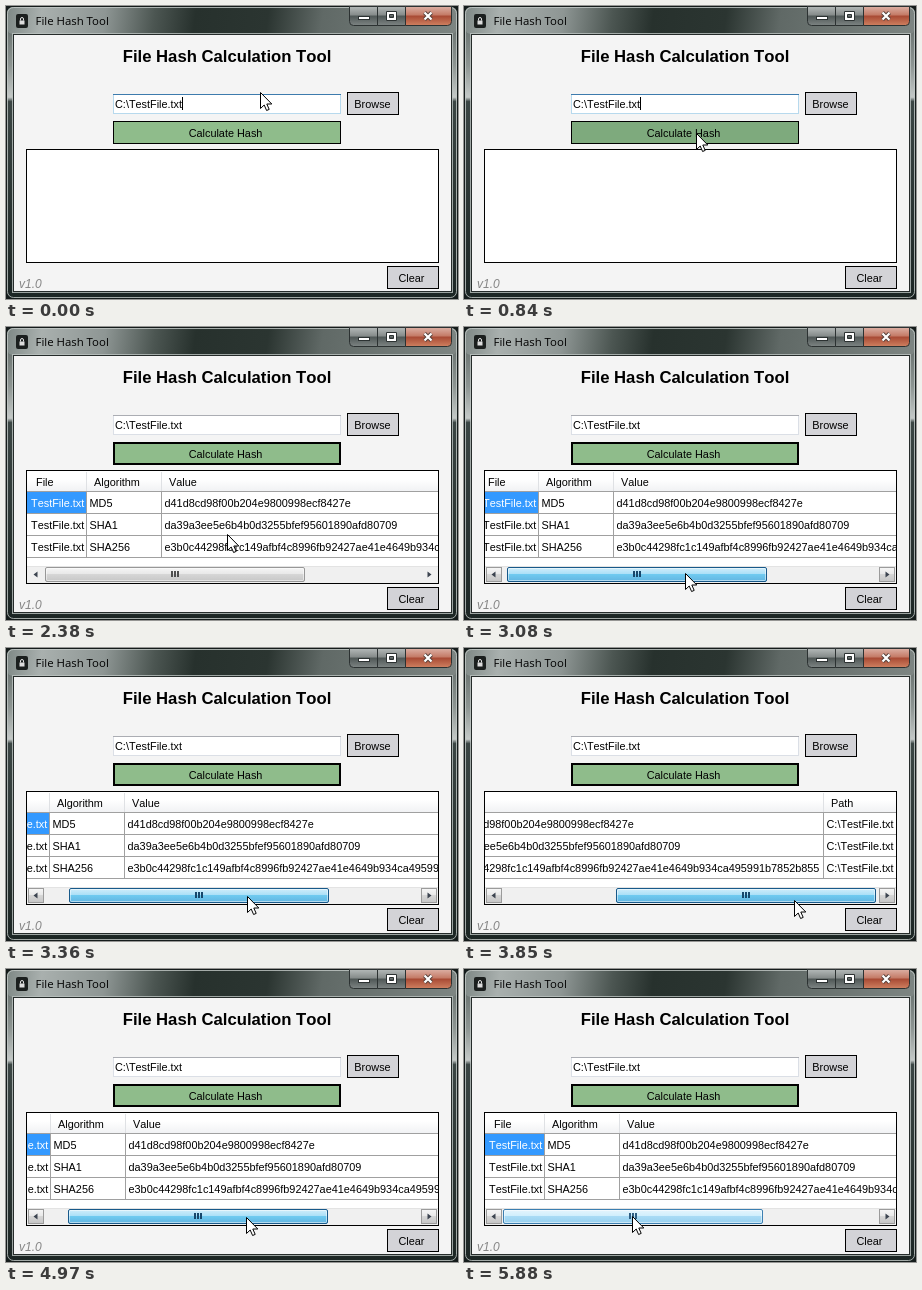
Animation of 452x293 px, one loop 6020 ms. Source, as an HTML page:

```html
<!DOCTYPE html>
<html lang="en">
<head>
<meta charset="utf-8">
<title>File Hash Tool</title>
<style>
  html, body { margin: 0; width: 100%; height: 100%; overflow: hidden; background: #1c2423; }
  svg { display: block; width: 452px; height: 293px; }
  text { font: 10.88px "Liberation Sans", Arial, sans-serif; font-kerning: none; white-space: pre; }
  .mid { text-anchor: middle; }
  .crisp { shape-rendering: crispEdges; }
  .heading { font-size: 16.7px; font-weight: bold; }
  .caption { font: 11.4px "Open Sans", "Noto Sans", sans-serif; }
  .status { font-size: 12px; }
  .version { font-size: 12px; font-style: italic; fill: #868686; }
  .line { stroke: #a0a0a0; }
  .headline { stroke: #dfe1e4; }
</style>
</head>
<body>
<svg viewBox="0 0 452 293">
  <defs>
    <linearGradient id="side" x2="0" y2="1">
      <stop offset="0" stop-color="#59625f"/><stop offset=".2" stop-color="#8d9592"/>
      <stop offset=".31" stop-color="#c4c9c7"/><stop offset=".325" stop-color="#3b4644"/>
      <stop offset="1" stop-color="#1c2624"/>
    </linearGradient>
    <linearGradient id="bar" gradientUnits="userSpaceOnUse" x1="0" y1="0" x2="446" y2="60">
      <stop offset="0" stop-color="#7d8784"/><stop offset=".08" stop-color="#a9b0ae"/>
      <stop offset=".22" stop-color="#8e9694"/><stop offset=".33" stop-color="#4c5652"/>
      <stop offset=".42" stop-color="#27312d"/><stop offset=".58" stop-color="#2b3531"/>
      <stop offset=".7" stop-color="#606966"/><stop offset="1" stop-color="#7d8582"/>
    </linearGradient>
    <linearGradient id="glass" x2="0" y2="1">
      <stop offset="0" stop-color="#b4b9b8"/><stop offset=".45" stop-color="#858b8a"/>
      <stop offset=".5" stop-color="#4f5756"/><stop offset="1" stop-color="#7d8483"/>
    </linearGradient>
    <linearGradient id="red" x2="0" y2="1">
      <stop offset="0" stop-color="#dcb0a4"/><stop offset=".45" stop-color="#c47a66"/>
      <stop offset=".5" stop-color="#a84a34"/><stop offset="1" stop-color="#cf8060"/>
    </linearGradient>
    <linearGradient id="header" x2="0" y2="1">
      <stop offset=".4" stop-color="#fff"/><stop offset="1" stop-color="#f1f2f4"/>
    </linearGradient>
    <linearGradient id="idle" x2="0" y2="1">
      <stop offset="0" stop-color="#f6f6f6"/><stop offset=".48" stop-color="#e8e8e8"/>
      <stop offset=".5" stop-color="#d6d6d6"/><stop offset="1" stop-color="#c6c6c6"/>
    </linearGradient>
    <linearGradient id="hover" x2="0" y2="1">
      <stop offset="0" stop-color="#e6f5fd"/><stop offset=".48" stop-color="#cfeefc"/>
      <stop offset=".5" stop-color="#a9dbf5"/><stop offset="1" stop-color="#98d0ef"/>
    </linearGradient>
    <linearGradient id="pressed" x2="0" y2="1">
      <stop offset="0" stop-color="#d2eefb"/><stop offset=".48" stop-color="#a9dff7"/>
      <stop offset=".5" stop-color="#6fcaf0"/><stop offset="1" stop-color="#62b4e0"/>
    </linearGradient>
    <clipPath id="view"><rect x="21" y="144" width="411" height="112"/></clipPath>
  </defs>

  <rect width="452" height="293" fill="#151c1b"/>
  <rect x="1" y="1" width="450" height="291" rx="6" fill="url(#side)"/>
  <rect x="1" y="1" width="450" height="27" rx="6" fill="url(#bar)"/>
  <rect x="1.5" y="1.5" width="449" height="290" rx="6" fill="none" stroke="#c3cac7" stroke-opacity=".8"/>
  <rect class="crisp" x="6.5" y="27.5" width="440" height="259" fill="none" stroke="#bcc4c1" stroke-opacity=".8"/>
  <rect class="crisp" x="7.5" y="28.5" width="438" height="257" fill="#f4f4f4" stroke="#252b2a"/>

  <rect x="10" y="8" width="12" height="14" rx="2" fill="#1b1f1e"/>
  <path d="M14.500 14.500v-1.5a1.500 1.500 0 0 1 3 0v1.500" fill="none" stroke="#e4e4e4"/>
  <rect x="13.500" y="14.500" width="5" height="4" fill="#ddd"/>
  <text class="caption" x="29.500" y="19">File Hash Tool</text>

  <g stroke="#2c3232">
    <path d="M343.5 0.5h28v19h-24q-4 0-4-4z" fill="url(#glass)"/>
    <path d="M371.5 0.5h28v19h-28z" fill="url(#glass)"/>
    <path d="M399.5 0.5h46v15q0 4-4 4h-42z" fill="url(#red)"/>
    <rect x="352.5" y="10.5" width="11" height="3" fill="#fff"/>
    <path d="M380.5 5.5h10v9h-10zM383.5 8.5v3h4v-3z" fill="#fff" fill-rule="evenodd"/>
  </g>
  <path d="M418.500 6.500l7 7m0-7l-7 7" stroke="#54403a" stroke-width="4"/>
  <path d="M418.500 6.500l7 7m0-7l-7 7" stroke="#fff" stroke-width="2.2"/>

  <text class="heading mid" x="221" y="56">File Hash Calculation Tool</text>
  <text id="status" class="status mid" x="219" y="81">Calculating File Hash</text>

  <g class="crisp">
    <rect id="field" x="107.5" y="88.5" width="227" height="19" fill="#fff"/>
    <path id="fieldTop" d="M107 88.500h228"/>
    <path id="caret" d="M176.500 91v13" stroke="#000"/>
    <rect x="341.5" y="86.500" width="51" height="22" fill="#d3d3d7" stroke="#000"/>
    <rect x="381.5" y="260.5" width="51" height="22" fill="#d3d3d7" stroke="#000"/>
    <rect id="calc" x="107.500" y="115.500" width="227" height="22" stroke="#000"/>
    <rect id="focus" x="108.500" y="116.500" width="225" height="20" fill="none" stroke="#000"/>
    <rect x="20.5" y="143.5" width="412" height="113" fill="#fff" stroke="#000"/>
  </g>
  <text x="109" y="102">C:\TestFile.txt</text>
  <text class="mid" x="366.500" y="102">Browse</text>
  <text class="mid" x="405.500" y="276">Clear</text>
  <text class="mid" x="219.500" y="131">Calculate Hash</text>
  <text class="version" x="13" y="282">v1.0</text>

  <g id="results" clip-path="url(#view)">
    <rect x="21" y="144" width="411" height="20" fill="url(#header)"/>
    <g id="grid"></g>
    <g class="crisp">
      <rect x="21" y="239" width="411" height="17" fill="#f0f0f0"/>
      <rect x="21" y="239" width="411" height="1" fill="#e3e3e3"/>
      <g id="arrows" fill="url(#idle)" stroke="#9b9b9b">
        <rect x="22.5" y="240.5" width="15" height="14" rx="1"/>
        <rect x="415.5" y="240.5" width="15" height="14" rx="1"/>
      </g>
    </g>
    <path d="M31.500 244.500v6l-4-3zM421.500 244.500v6l4-3z" fill="#3c4450"/>
    <g id="thumb">
      <rect id="thumbFace" x="39.5" y="240.5" width="259" height="14" rx="1.500"/>
      <rect x="40.5" y="241.5" width="257" height="12" rx="1" fill="none" stroke="#fff" stroke-opacity=".5"/>
      <path id="grip" d="M166 244v6m3-6v6m3-6v6" stroke-width="2"/>
    </g>
  </g>

  <path id="cursor" d="M.5 .5V16.500L4.200 13 6.600 18.500 9.200 17.400 6.800 12H11.800Z" fill="#fff" stroke="#000"/>
</svg>
<script>
const LOOP = 6020, TICK = 70;
const CARET_OFF = 70, CARET_BACK = 630, CLICK = 980, RELEASE = 1050,
      SHOW = 1610, GRAB = 2730, DROP = 5600;
const THUMB_MIN = 39, THUMB_MAX = 154, GRAB_X = 178, SCROLL_RATIO = 1.55;

// time, pointer x, pointer y
const PATH = [
  [0, 254, 86], [490, 254, 86], [840, 232, 127], [1960, 232, 127],
  [2310, 222, 196], [2590, 217, 241], [2730, 217, 245], [3010, 217, 245],
  [3080, 221, 246], [3360, 241, 248], [3640, 285, 250], [3850, 330, 252],
  [4060, 334, 252], [4480, 334, 252], [4690, 302, 251], [4970, 240, 248],
  [5110, 192, 247], [5250, 170, 247], [5320, 170, 247], [5390, 169, 247],
  [5810, 169, 247], [5880, 168, 247], [LOOP, 168, 247]
];

const $ = id => document.getElementById(id);
const set = (id, attrs) => {
  for (const name in attrs) $(id).setAttribute(name, attrs[name]);
};
const show = (id, on) => set(id, { visibility: on ? "inherit" : "hidden" });

function buildGrid() {
  const file = "TestFile.txt";
  const rows = [
    ["MD5", "d41d8cd98f00b204e9800998ecf8427e"],
    ["SHA1", "da39a3ee5e6b4b0d3255bfef95601890afd80709"],
    ["SHA256", "e3b0c44298fc1c149afbf4c8996fb92427ae41e4649b934ca495991b7852b855"]
  ];
  const left = [22, 80, 155, 534];
  const text = (x, y, s, fill = "#000") => `<text x="${x}" y="${y}" fill="${fill}">${s}</text>`;
  const line = (d, kind) => `<path class="crisp ${kind}" d="${d}"/>`;
  let out = '<rect class="crisp" x="21" y="165" width="59" height="21" fill="#39f"/>';
  ["File", "Algorithm", "Value", "Path"].forEach((s, i) => out += text(left[i] + 8, 159, s));
  rows.forEach(([name, hash], r) => {
    const y = 180 + 22 * r;
    [file, name, hash, "C:\\" + file].forEach((s, i) =>
      out += text(left[i] + (i ? 3.5 : 3), y, s, r || i ? "#000" : "#fff"));
  });
  for (const x of [80.5, 155.5, 534.5, 609.5])
    out += line(`M${x} 145V164`, "headline") + line(`M${x} 164V231`, "line");
  for (let y = 164.5; y < 235; y += 22) out += line(`M21 ${y}H610`, "line");
  $("grid").innerHTML = out;
}

function pointerAt(t) {
  const i = PATH.findIndex(p => p[0] > t);
  const [t0, x0, y0] = PATH[i - 1], [t1, x1, y1] = PATH[i];
  const k = (t - t0) / (t1 - t0);
  return [Math.round(x0 + (x1 - x0) * k), Math.round(y0 + (y1 - y0) * k)];
}

function draw(t) {
  const [x, y] = pointerAt(t);
  set("cursor", { transform: `translate(${x} ${y})` });

  const typing = t < CLICK;
  show("caret", t < CARET_OFF || (t >= CARET_BACK && typing));
  set("field", { stroke: typing ? "#b7d9ed" : "#dbdfe6" });
  set("fieldTop", { stroke: typing ? "#3d7bad" : "#abadb3" });

  const over = x > 107 && x < 335 && y >= 115 && y < 138;
  const down = t >= CLICK && t < RELEASE;
  set("calc", { fill: down ? "#729d72" : over ? "#7eaa7d" : "#8fbc8b" });
  show("focus", !typing);
  show("status", t >= RELEASE && t < SHOW);

  show("results", t >= SHOW);
  const held = t >= GRAB && t < DROP;
  const near = t >= SHOW && y >= 239;
  const shift = held ? Math.max(0, Math.min(THUMB_MAX, x - GRAB_X) - THUMB_MIN) : 0;
  set("thumb", { transform: `translate(${shift} 0)` });
  set("grid", { transform: `translate(${-Math.round(shift * SCROLL_RATIO)} 0)` });
  set("thumbFace", {
    fill: `url(#${held ? "pressed" : near ? "hover" : "idle"})`,
    stroke: held ? "#18598a" : near ? "#3c7fb1" : "#979797"
  });
  set("grip", { stroke: held ? "#17476b" : near ? "#2f5f83" : "#4f4f4f" });
  set("arrows", { opacity: near ? 1 : 0 });
}

buildGrid();
const start = performance.now();
function frame() {
  const t = (performance.now() - start) % LOOP;
  draw(Math.floor(t / TICK) * TICK);
  requestAnimationFrame(frame);
}
frame();
</script>
</body>
</html>
```
